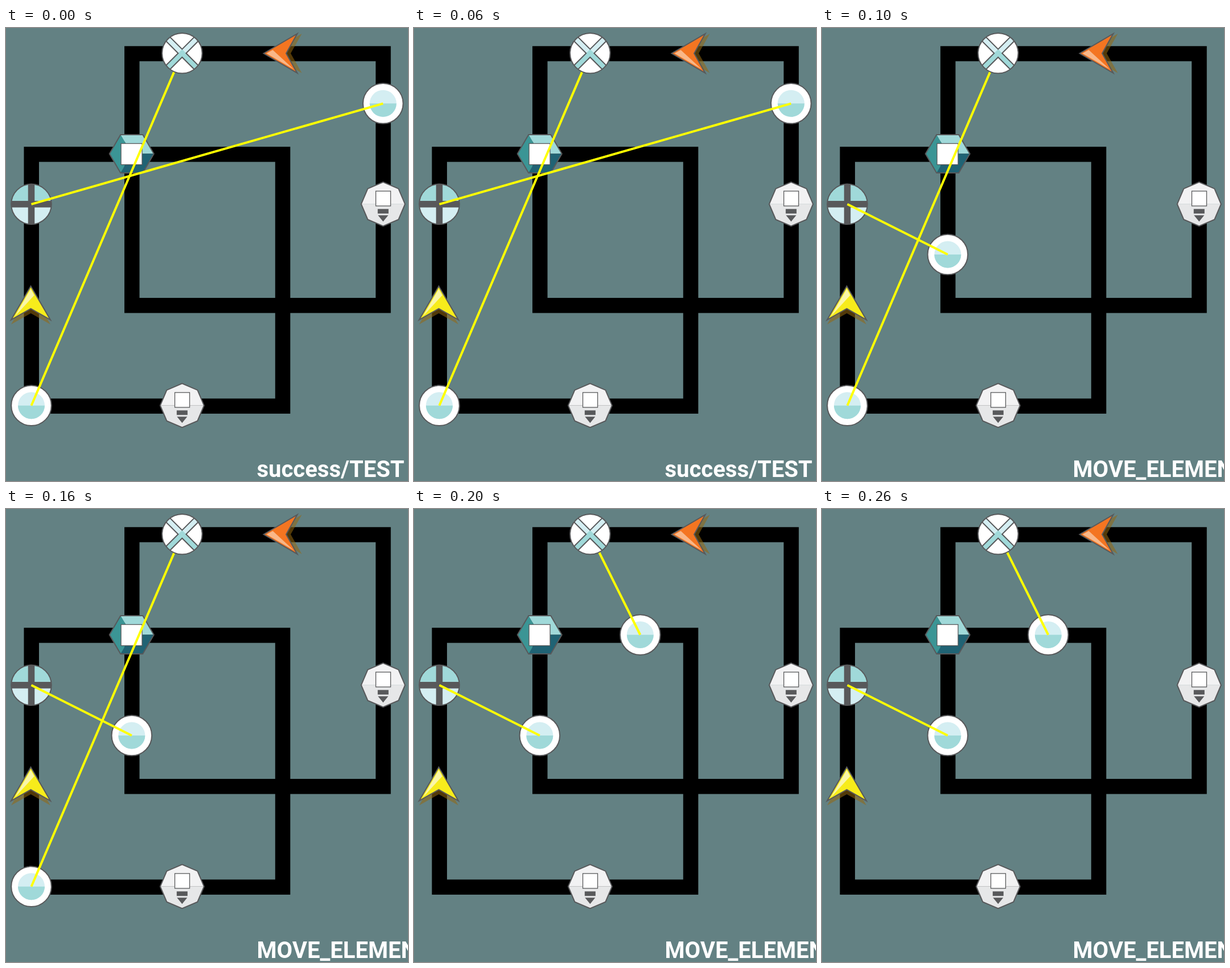
Recreate the animation shown at these times as an HTML page. Size 706x794 px, loop 300 ms.

```html
<!DOCTYPE html>
<html lang="en">
<head>
<meta charset="utf-8">
<title>Track elements</title>
<style>
html, body { margin: 0; width: 100%; height: 100%; overflow: hidden; background: #638183; }
svg { display: block; }
text { font: 700 40px Roboto, Arial, sans-serif; fill: #fff; }
.edge { stroke: #58595b; stroke-width: 2; }
.link { stroke: #ff0; stroke-width: 4; }
</style>
</head>
<body>
<svg width="706" height="794" viewBox="0 0 706 794">
  <defs>
    <g id="dot">
      <circle class="edge" r="35.3" fill="#fff"/>
      <circle r="23.5" fill="#d4eef2"/>
      <path d="M-23.5 0A23.5 23.5 0 0 0 23.5 0Z" fill="#a0d9d9"/>
    </g>
    <g id="gate">
      <path d="M-38.5 0L-27 -27L0 -38.5L27 -27L38.5 0Z" fill="#f2f2f3"/>
      <path d="M-38.5 0L-27 27L0 38.5L27 27L38.5 0Z" fill="#e6e7e8"/>
      <path class="edge" d="M-38.5 0L-27 -27L0 -38.5L27 -27L38.5 0L27 27L0 38.5L-27 27Z" fill="none"/>
      <rect x="-12.8" y="-22.8" width="26" height="26" fill="#fff" stroke="#58595b" stroke-width="1.3"/>
      <path d="M-9.5 8.5H9.5V16.5H-9.5ZM-9 19.5H9L0 30.5Z" fill="#58595b"/>
    </g>
    <path id="arrow" d="M0 0L34.5 59L0 39.5L-34.5 59Z"/>
    <path id="shine" d="M0 5L6 16L-28 53Z"/>
    <clipPath id="disc"><circle r="35.3"/></clipPath>
  </defs>

  <g fill="none" stroke="#000" stroke-width="26.5">
    <rect x="44.7" y="221.4" width="441.3" height="441.3"/>
    <rect x="221.2" y="45" width="441.3" height="441.3"/>
  </g>

  <g transform="translate(43.5 452.5)">
    <use href="#arrow" y="8" fill="#966910" fill-opacity=".55"/>
    <use href="#arrow" class="edge" fill="#f7ec1b"/>
    <use href="#shine" fill="#faf6a8"/>
  </g>
  <g transform="translate(452.5 44.5) rotate(-90)">
    <use href="#arrow" y="8" fill="#966910" fill-opacity=".55"/>
    <use href="#arrow" class="edge" fill="#f47521"/>
    <use href="#shine" fill="#f9b788"/>
  </g>

  <use href="#gate" x="309.3" y="661.7"/>
  <use href="#gate" x="662.3" y="308.7"/>

  <g transform="translate(220.7 220.5)">
    <path d="M-19.5 -33.5H19.5L39 0H0Z" fill="#a0d9d9"/>
    <path d="M-39 0L-19.5 -33.5L0 0L-19.5 33.5Z" fill="#3b9595"/>
    <path d="M39 0L19.5 33.5H-19.5L0 0Z" fill="#206374"/>
    <path class="edge" d="M-39 0L-19.5 -33.5H19.5L39 0L19.5 33.5H-19.5Z" fill="none"/>
    <rect x="-18.7" y="-18" width="37" height="37" fill="#fff" stroke="#58595b" stroke-width="1.3"/>
  </g>

  <g transform="translate(44.5 308.8)">
    <circle r="35.3" fill="#d4eef2"/>
    <path d="M-35.3 0A35.3 35.3 0 0 1 35.3 0Z" fill="#a0d9d9"/>
    <path d="M-35 0H35M0 -35V35" stroke="#58595b" stroke-width="11.5"/>
    <circle class="edge" r="35.3" fill="none"/>
  </g>

  <use href="#dot" id="dotA"/>
  <use href="#dot" id="dotB"/>
  <line class="link" id="linkA" x1="44.5" y1="308.8"/>
  <line class="link" id="linkB" x1="309.3" y1="44.2"/>

  <g transform="translate(309.3 44.2)">
    <circle r="35.3" fill="#fff"/>
    <g clip-path="url(#disc)">
      <path d="M-40 -40L0 0L40 -40" fill="none" stroke="#d4eef2" stroke-width="10"/>
      <path d="M-40 40L0 0L40 40" fill="none" stroke="#a0d9d9" stroke-width="10"/>
      <path class="edge" d="M-47 -40L-7 0L-47 40M47 -40L7 0L47 40M-40 -47L0 -7L40 -47M-40 47L0 7L40 47" fill="none"/>
    </g>
    <circle class="edge" r="35.3" fill="none"/>
  </g>

  <text id="label" x="440.5" y="787"></text>
</svg>
<script>
const el = id => document.getElementById(id);
const states = [
  { a: [662.2, 132.3], b: [44.5, 661.7], text: "success/TEST" },
  { a: [220.8, 397], b: [44.5, 661.7], text: "MOVE_ELEMENT" },
  { a: [220.8, 397], b: [397.3, 220.5], text: "MOVE_ELEMENT" }
];

function place(name, [x, y]) {
  const dot = el("dot" + name), link = el("link" + name);
  dot.setAttribute("x", x);
  dot.setAttribute("y", y);
  link.setAttribute("x2", x);
  link.setAttribute("y2", y);
}

function draw() {
  const state = states[Math.floor(performance.now() % 300 / 100)];
  place("A", state.a);
  place("B", state.b);
  el("label").textContent = state.text;
  requestAnimationFrame(draw);
}
draw();
</script>
</body>
</html>
```
